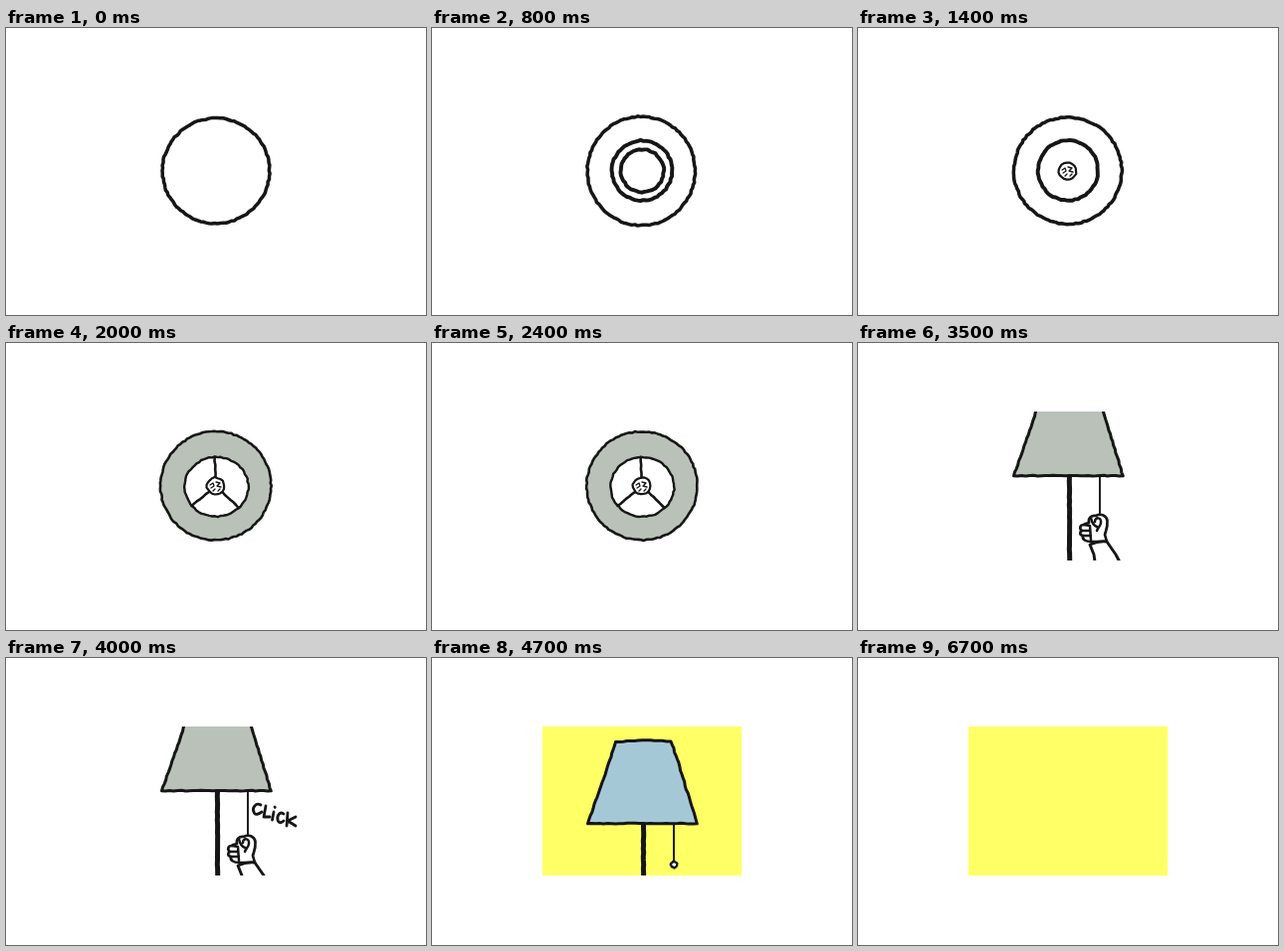
Write an HTML page that moves like this. It is 422 px wide and 289 px high and loops after 7700 ms.

```html
<!DOCTYPE html>
<html lang="en">
<head>
<meta charset="utf-8">
<title>Lamp</title>
<style>
  html, body { margin: 0; width: 100%; height: 100%; overflow: hidden; background: #fff; }
  svg { display: block; width: 422px; height: 289px; }
  g, path { stroke-linecap: round; stroke-linejoin: round; }
</style>
</head>
<body>
<svg id="stage" viewBox="0 0 422 289" role="img" aria-label="A lamp is switched on: CLICK">
  <defs><clipPath id="view"><rect x="111" y="69" width="200" height="150"/></clipPath></defs>
  <g id="film" clip-path="url(#view)"></g>
</svg>
<script>
const LOOP = 7700;
const INK = '#161616', GREY = '#b9c1b8', BLUE = '#a5c8d7', YELLOW = '#ffff66';

function random(seed) {
  let s = seed * 7919 + 17;
  return () => (s = (s * 16807) % 2147483647) / 2147483647 - 0.5;
}

const stroke = (d, width = 2.5, fill = 'none') =>
  `<path d="${d}" fill="${fill}" stroke="${INK}" stroke-width="${width}"/>`;

const toPath = points => 'M' + points.map(p => p.map(n => n.toFixed(1)).join(' ')).join('L');

// Hand-drawn ring: a closed outline with a slightly uneven radius.
function ring(cx, cy, rx, ry, seed, width = 3.4, fill = 'none') {
  const rnd = random(seed), count = Math.max(16, Math.round(rx * 2.2));
  const points = Array.from({ length: count }, (_, i) => {
    const a = i / count * Math.PI * 2, j = rnd() * 1.1;
    return [cx + (rx + j) * Math.cos(a), cy + (ry + j) * Math.sin(a)];
  });
  return stroke(toPath(points) + 'Z', width, fill);
}

// Hand-drawn line through a few corners.
function rough(corners, seed, amount = 0.8) {
  const rnd = random(seed), points = [corners[0]];
  for (let i = 1; i < corners.length; i++) {
    const [x0, y0] = corners[i - 1], [x1, y1] = corners[i];
    const n = Math.max(1, Math.round(Math.hypot(x1 - x0, y1 - y0) / 4));
    for (let k = 1; k <= n; k++) {
      const j = k < n ? amount : 0;
      points.push([x0 + (x1 - x0) * k / n + rnd() * j, y0 + (y1 - y0) * k / n + rnd() * j]);
    }
  }
  return toPath(points);
}

const outlines = [
  [211, 143.8, 53.8, 53], [211, 144.2, 55.5, 55], [210.8, 143.7, 54.2, 53.7], [210.2, 144, 54.2, 54.8]
];
const outer = (n, seed) => ring(...outlines[n], seed, 3.5);
const middle = seed => ring(211, 143.5, 30.2, 30.2, seed, 3.9);
const inner = (r, seed) => ring(211.4, 143.8, r, r, seed, 3.9);

const hub = seed => ring(210.6, 144, 8.8, 8.5, seed, 2.2, '#fff') +
  stroke('M205 143l3-2 1 3-3 2M211 140l4 1-3 3 4 1M208 149l2-2M213 149l2-2', 1.3);

const spokes = seed =>
  stroke(rough([[209.7, 115], [210.5, 135]], seed), 2.6) +
  stroke(rough([[204, 150], [186.5, 164]], seed + 1), 2.6) +
  stroke(rough([[217.5, 150], [233.5, 166]], seed + 2), 2.6);

const topView = (seed, dx = 0) =>
  ring(210.7 + dx, 143.8, 55.6, 54.7, seed, 2.6, GREY) +
  ring(211.4, 144.8, 32, 30, seed + 1, 2.4, '#fff') + spokes(seed + 2) + hub(seed + 5);

function lamp(color, seed, dy = 0, cordEnd = 204, knob = true) {
  const outline = [[156.5, 166.8], [175, 114], [184.5, 84.5], [211, 82.8], [240, 84],
    [246.5, 102], [251, 117], [266.3, 166.8], [212, 166.4], [156.5, 166.8]].map(([x, y]) => [x, y + dy]);
  return stroke(rough(outline, seed), 3, color) +
    stroke(rough([[212.5, 168 + dy], [212.5, 224]], seed + 1, 0.5), 5) +
    stroke(`M243 ${168 + dy}V${cordEnd}`, 1.9) +
    (knob ? ring(243.2, cordEnd + 4, 3, 3.1, seed + 2, 2.3, '#fff') : '');
}

const fist = (dx, dy) => `<g transform="translate(${dx} ${dy})">` +
  stroke('M234 206C229 206 225 204 226 200C222 199 223 196 225 195C222 193 223 189 227 189' +
    'C229 187 231 188 232 187C231 182 235 179 239 180C244 177 250 180 250.5 185' +
    'C251 192 249 195 248 199L250 206Z', 2.7, '#fff') +
  stroke('M227 189L233 190L234 204M225 195L233 195M226 200L234 200M234 182C235 187 237 190 240 191' +
    'M238 186C238 181 245 181 244 187C244 190 241 192 240 195', 2.5) +
  stroke('M240 240L237 219L233 209Q242 205 250 206L259 219L270 240', 2.9, '#fff') + '</g>';

const openHand =
  stroke('M278 200C270 202 261 200 256 194L249 187C246 183 250 180 254 184L260 188' +
    'L252 178C250 174 255 172 258 176L265 183C264 177 268 175 271 179' +
    'C278 181 282 187 285 194Z', 2.7, '#fff') +
  stroke('M265 183L269 187M260 188L265 191', 2.4) +
  stroke('M286 226L275 203Q280 195 288 194L302 218L307 226', 2.9, '#fff');

const click = stroke('M256 148C251 145 247 151 249 155C250 159 254 157 257 155' +
  'M261 149L259 160L265 160M269 155L267.5 163M270 150L270.3 150.4' +
  'M279 157C275 154 272 159 273 163C274 167 277 166 279 164' +
  'M283 156L282 169M291 160L283 164L291 169', 2.8);

const paper = `<rect x="111" y="69" width="200" height="150" fill="${YELLOW}"/>`;
const closeUp = (color, seed, cordEnd, knob) => lamp(color, seed, -33, cordEnd, knob);

// Start time in ms and the drawing shown from then on.
const steps = [
  [0, outer(0, 1)],
  [200, outer(1, 2)],
  [400, outer(2, 3) + middle(4)],
  [600, outer(0, 5) + middle(6)],
  [800, outer(3, 7) + middle(8) + inner(21.5, 9)],
  [1000, outer(2, 10) + middle(11) + inner(17, 12)],
  [1200, outer(0, 13) + middle(14) + inner(12, 15)],
  [1400, outer(2, 16) + middle(17) + hub(18)],
  [1600, outer(0, 19) + middle(20) + spokes(21) + hub(24)],
  [1800, outer(2, 25) + middle(26) + spokes(27) + hub(30)],
  [2000, topView(31)],
  [2200, topView(41, -0.3)],
  [2400, topView(51, 0.3)],
  [2600, lamp(GREY, 61)],
  [2800, lamp(GREY, 71)],
  [3000, closeUp(GREY, 81, 172, true) + openHand],
  [3500, closeUp(GREY, 81, 174, false) + fist(0, -6)],
  [4000, closeUp(GREY, 81, 180, false) + fist(0, 0) + click],
  [4500, paper + closeUp(BLUE, 81, 180, false) + fist(0, 0)],
  [4700, paper + lamp(BLUE, 71)],
  [6700, paper]
];

const film = document.getElementById('film');
film.innerHTML = steps.map(([, art]) => `<g opacity="0">${art}</g>`).join('');

const startTime = document.timeline.currentTime || 0;
steps.forEach(([from], i) => {
  const to = i + 1 < steps.length ? steps[i + 1][0] : LOOP;
  const key = (opacity, time) => ({ opacity, offset: time / LOOP, easing: 'steps(1, end)' });
  const frames = [key(1, from), key(0, to)];
  if (from > 0) frames.unshift(key(0, 0));
  if (to < LOOP) frames.push(key(0, LOOP));
  film.children[i].animate(frames, { duration: LOOP, iterations: Infinity }).startTime = startTime;
});
</script>
</body>
</html>
```
